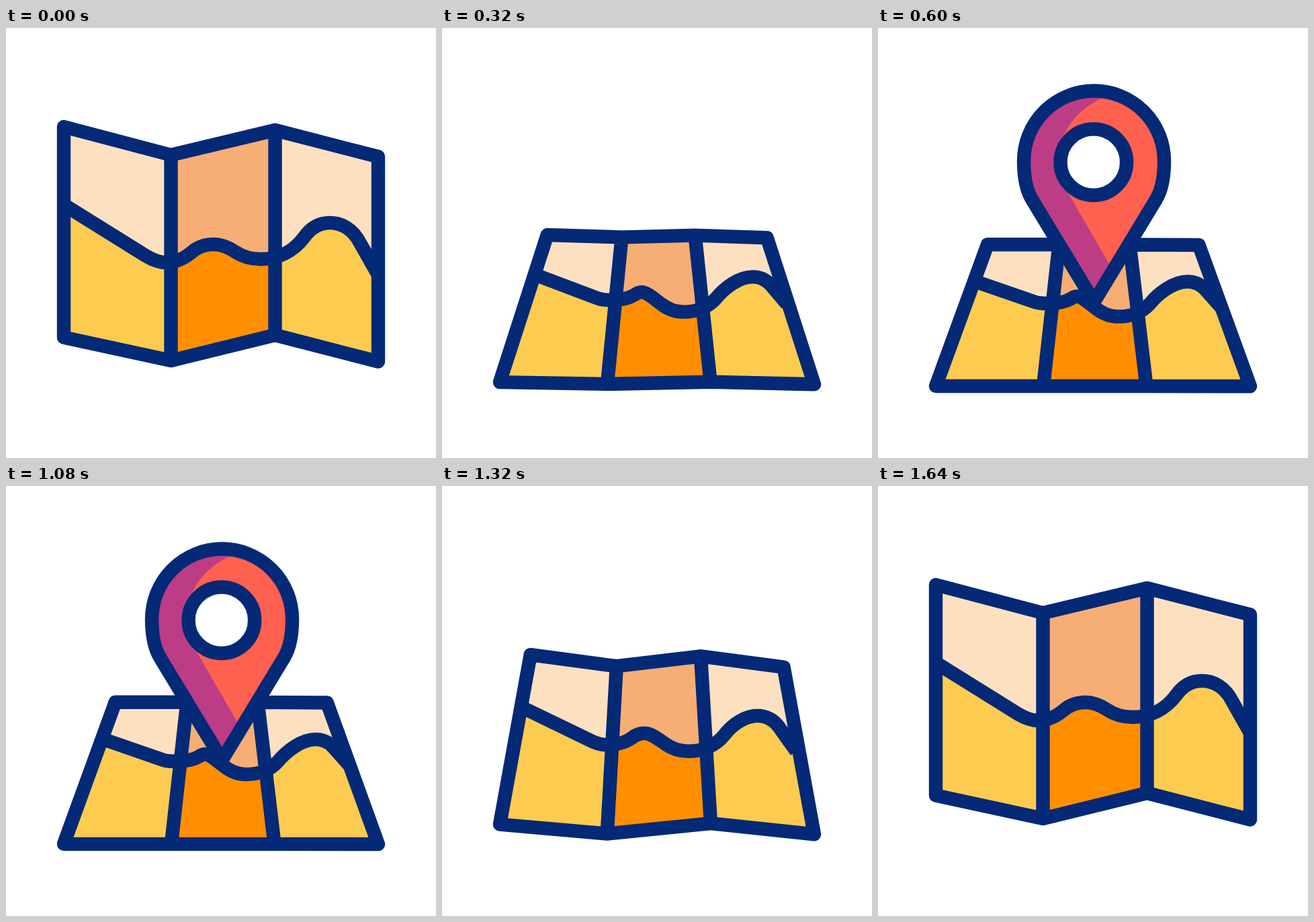
An HTML page that plays this animation: 640x640 px, repeating every 2 s.

```html
<!DOCTYPE html>
<html lang="en">
<head>
<meta charset="utf-8">
<title>Map and pin</title>
<style>
  html, body { margin: 0; width: 100%; height: 100%; overflow: hidden; background: #fff; }
  svg { display: block; width: 100vw; height: 100vh; }

  .line { fill: none; stroke: #042976; stroke-width: 20.4; stroke-linejoin: round; }
  .map path { animation: 2s cubic-bezier(.67, 0, .33, 1) infinite; }

  .map .left { animation-name: left; }
  .map .mid { animation-name: mid; }
  .map .right { animation-name: right; }
  .map .land { animation-name: land; }
  .map .wave { animation-name: wave; }
  .map .edge { animation-name: edge; }

  .pin { transform-origin: 321.5px 408px; animation: pin 2s infinite; }

  /* Upright at 0% and from 82%, lying flat from 22% to 52% */
  @keyframes left {
    0%, 82%, 100% { d: path("M86 147L245.5 189V495L86 460.5Z"); }
    22%, 52% { d: path("M163 322.3L269.5 322.3L246 533L86 533Z"); }
  }
  @keyframes mid {
    0%, 82%, 100% { d: path("M245.5 189L400.5 152L400.5 457L245.5 495Z"); }
    22%, 52% { d: path("M269.5 322.3L374.5 322.5L399.5 533L246 533Z"); }
  }
  @keyframes right {
    0%, 82%, 100% { d: path("M400.5 152L554 191.5L554 496.5L400.5 457Z"); }
    22%, 52% { d: path("M374.5 322.5L477.5 323L554 533.3L399.5 533Z"); }
  }
  @keyframes left {
    0%, 82%, 100% { d: path("M86 147L245.5 189L245.5 495L86 460.5Z"); }
    22%, 52% { d: path("M163 322.3L269.5 322.3L246 533L86 533Z"); }
  }
  @keyframes edge {
    0%, 82%, 100% { d: path("M86 147L245.5 189L400.5 152L554 191.5L554 496.5L400.5 457L245.5 495L86 460.5ZM245.5 189L245.5 495M400.5 152L400.5 457"); }
    22%, 52% { d: path("M163 322.3L269.5 322.3L374.5 322.5L477.5 323L554 533.3L399.5 533L246 533L86 533ZM269.5 322.3L246 533M374.5 322.5L399.5 533"); }
  }
  @keyframes wave {
    0%, 82%, 100% { d: path("M86 263L208 339C218 345 227 349 238 349C252 349 264 344 276 334C285 326 296 322 309 322C321 322 331 326.5 341 333C353 341 365 344 379 344C403 344 427 334 444 311C454 297 467 290 482 290C500 290 517 300 527 320L552.5 365"); }
    22%, 52% { d: path("M150 379L234 408C240 410 246 410 252 410C264 410 277 409 287 403C290 401 292 399.5 296 399.5C303 399.5 312 408 324 417C334 425 345 429.5 357 429.5C376 429.5 391 425 404 411C418 394 440 377.5 461 377.5C470 377.5 479 381 486 388L510 415"); }
  }
  /* The wave, closed along the bottom of the map */
  @keyframes land {
    0%, 82%, 100% { d: path("M86 263L208 339C218 345 227 349 238 349C252 349 264 344 276 334C285 326 296 322 309 322C321 322 331 326.5 341 333C353 341 365 344 379 344C403 344 427 334 444 311C454 297 467 290 482 290C500 290 517 300 527 320L552.5 365L554 496.5L400.5 457L245.5 495L86 460.5Z"); }
    22%, 52% { d: path("M150 379L234 408C240 410 246 410 252 410C264 410 277 409 287 403C290 401 292 399.5 296 399.5C303 399.5 312 408 324 417C334 425 345 429.5 357 429.5C376 429.5 391 425 404 411C418 394 440 377.5 461 377.5C470 377.5 479 381 486 388L510 415L554 533.3L399.5 533L246 533L86 533Z"); }
  }
  @keyframes pin {
    0%, 16% { transform: scale(0); animation-timing-function: cubic-bezier(.4, 0, .4, 1); }
    27% { transform: scale(1.03, .985); animation-timing-function: ease-in-out; }
    30%, 54% { transform: scale(1); animation-timing-function: cubic-bezier(.67, 0, .33, 1); }
    66%, 100% { transform: scale(0); }
  }
</style>
</head>
<body>
<svg viewBox="0 0 640 640">
  <clipPath id="fold" class="map"><path class="mid"/></clipPath>

  <g class="map">
    <path class="left" fill="#fde0bf"/>
    <path class="right" fill="#fde0bf"/>
    <path class="land" fill="#fdcb50"/>
    <path class="mid" fill="#f7ae75"/>
    <g clip-path="url(#fold)"><path class="land" fill="#ff8f00"/></g>
    <path class="wave line"/>
    <path class="edge line"/>
  </g>

  <g class="pin">
    <path fill="#ff6151" d="M321.5 407.7L229 255C220 240 217 219 217 198A104.5 104.5 0 0 1 426 198C426 219 423 240 414 255Z"/>
    <path fill="#bc3d86" d="M321.5 407.7L229 255C220 240 217 219 217 198A104.5 104.5 0 0 1 352 98C304 110 268 152 268 198C268 216 273 230 282 244L348 358Z"/>
    <path class="line" d="M321.5 407.7L229 255C220 240 217 219 217 198A104.5 104.5 0 0 1 426 198C426 219 423 240 414 255Z"/>
    <circle class="line" cx="320.8" cy="199.7" r="49.3" style="fill: #fff"/>
  </g>
</svg>
</body>
</html>
```
